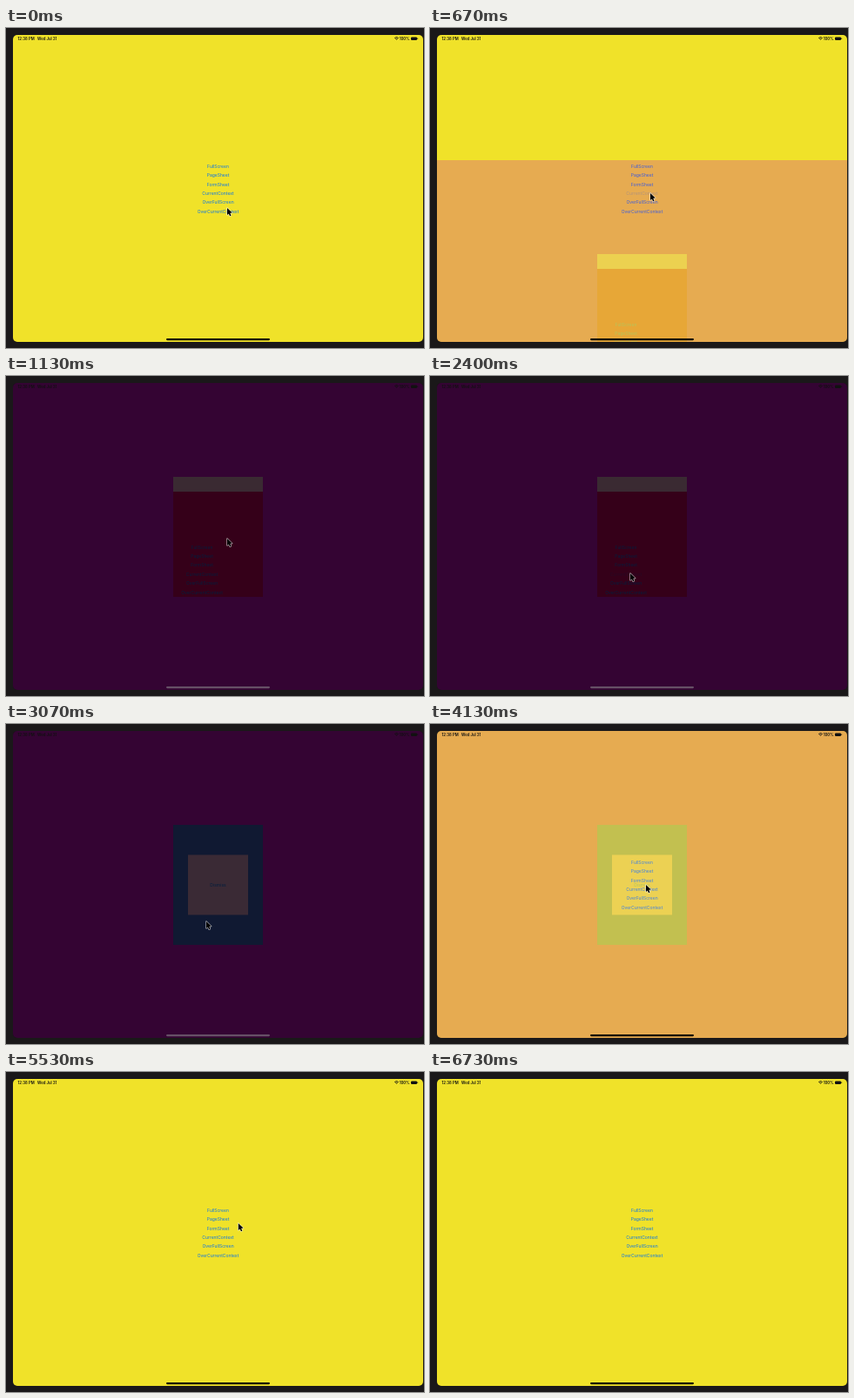
Recreate the animation shown at these times as an HTML page with a canvas. Size 480 by 368 pixels, loop 7.07 s.

```html
<!DOCTYPE html>
<html lang="en">
<head>
<meta charset="utf-8">
<style>
  html, body { margin: 0; width: 100%; height: 100%; overflow: hidden; background: #1a1819; }
  canvas { display: block; }
</style>
</head>
<body>
<canvas id="stage" width="480" height="368"></canvas>
<script>
const W = 480, H = 368, LOOP = 7070;
const SCREEN = { x: 8, y: 8, w: 471, h: 353 };
const STYLES = ['FullScreen', 'PageSheet', 'FormSheet', 'CurrentContext', 'OverFullScreen', 'OverCurrentContext'];
const BLUE = '#0a74e8';

const ctx = document.getElementById('stage').getContext('2d');
const layer = document.createElement('canvas');
layer.width = W;
layer.height = H;
const sheet = layer.getContext('2d');

// Pointer path: time, x, y
const PATH = [
  [0, 254, 207], [70, 254, 207], [330, 253, 190], [670, 253, 190],
  [1000, 254, 187], [1500, 254, 187], [1930, 230, 227], [3070, 230, 227],
  [3470, 248, 185], [5370, 248, 185], [5870, 325, 140], [6430, 325, 140],
  [6730, 484, 374], [LOOP, 484, 374]
];

// Critically damped spring: the share of the distance left after t ms
function left(t) {
  const k = Math.max(0, t) * 0.024;
  return (1 + k) * Math.exp(-k);
}

function pointerAt(t) {
  const i = PATH.findIndex(p => p[0] > t);
  const [t0, x0, y0] = PATH[i - 1], [t1, x1, y1] = PATH[i];
  const p = (t - t0) / (t1 - t0), e = p * p * (3 - 2 * p);
  return [x0 + (x1 - x0) * e, y0 + (y1 - y0) * e];
}

function rect(c, color, x, y, w, h, r = 0) {
  c.fillStyle = color;
  c.beginPath();
  c.roundRect(x, y, w, h, r);
  c.fill();
}

function text(c, s, x, y, color, font = '5px', align = 'center') {
  c.font = font + ' Inter, "Liberation Sans", sans-serif';
  c.textAlign = align;
  c.textBaseline = 'middle';
  c.fillStyle = color;
  c.fillText(s, x, y);
}

function menu(c, x, y, pressed) {
  STYLES.forEach((s, i) => {
    c.globalAlpha = pressed && i === 3 ? 0.3 : 1;
    text(c, s, x, y + i * 10.4, BLUE);
  });
  c.globalAlpha = 1;
}

function drawSheet(t, dy) {
  sheet.clearRect(0, 0, W, H);
  sheet.save();
  sheet.translate(0, dy);
  rect(sheet, 'rgb(200,19,196)', 8, 8, 472, 353);
  if (t < 2930) {
    rect(sheet, 'rgb(223,162,192)', 192, 116, 103, 17);
    rect(sheet, 'rgb(204,0,96)', 192, 133, 103, 121);
    menu(sheet, 225, 197, t >= 2270 && t < 2470);
  }
  if (t >= 2388) {
    sheet.translate(0, 353 * left(t - 2388));
    rect(sheet, 'rgb(62,96,192)', 192, 116, 103, 138);
    rect(sheet, 'rgb(223,162,204)', 209, 150.5, 69, 69);
    sheet.globalAlpha = t >= 3870 && t < 3930 ? 0.3 : 1;
    text(sheet, 'Dismiss', 243.5, 185.2, BLUE);
  }
  sheet.restore();
  ctx.globalAlpha = 0.26;
  ctx.drawImage(layer, 0, 0);
  ctx.globalAlpha = 1;
}

function statusBar(dark) {
  const ink = '#111';
  text(ctx, '12:38 PM', 13.5, 12.3, ink, '600 4.3px', 'left');
  text(ctx, 'Wed Jul 31', 36, 12.3, ink, '600 4.3px', 'left');
  text(ctx, '100%', 463.5, 12.3, ink, '600 4.3px', 'right');
  rect(ctx, ink, 465, 10.6, 7, 3.4, 1);
  rect(ctx, ink, 472.4, 11.6, 0.7, 1.4);
  ctx.strokeStyle = ink;
  ctx.lineWidth = 0.8;
  for (const r of [0.6, 2, 3.4]) {
    ctx.beginPath();
    ctx.arc(448.5, 14, r, -Math.PI * 0.75, -Math.PI * 0.25);
    ctx.stroke();
  }
  rect(ctx, dark ? '#665066' : '#0c0c06', 184, 357, 119, 2.2, 1.1);
}

function pointer(x, y) {
  ctx.save();
  ctx.translate(x, y);
  ctx.beginPath();
  for (const [px, py] of [[0, 0], [0, 8], [1.8, 6.4], [3.1, 9.3], [4.5, 8.7], [3.3, 5.8], [5.8, 5.6]]) ctx.lineTo(px, py);
  ctx.closePath();
  ctx.strokeStyle = 'rgba(255,255,255,.75)';
  ctx.lineWidth = 1.2;
  ctx.lineJoin = 'round';
  ctx.stroke();
  ctx.fillStyle = '#000';
  ctx.fill();
  ctx.restore();
}

function draw(t) {
  // The presenting view is removed while the sheet is fully up
  const dark = t >= 1130 && t < 4130;
  rect(ctx, '#1a1819', 0, 0, W, H);
  ctx.save();
  ctx.beginPath();
  ctx.roundRect(SCREEN.x, SCREEN.y, SCREEN.w, SCREEN.h, 5);
  ctx.clip();
  rect(ctx, dark ? '#000' : '#f0e229', 8, 8, 472, 353);
  if (!dark) menu(ctx, 243.5, 159.2, t >= 470 && t < 730);
  if (t >= 588 && t < 4530) {
    const dy = t < 4130 ? 353 * left(t - 588) : 353 * (1 - left(t - 4130));
    drawSheet(t, dark ? 0 : dy);
  }
  statusBar(dark);
  ctx.restore();
  pointer(...pointerAt(t));
}

const start = performance.now();
function tick() {
  draw((performance.now() - start) % LOOP);
  requestAnimationFrame(tick);
}
tick();
</script>
</body>
</html>
```
